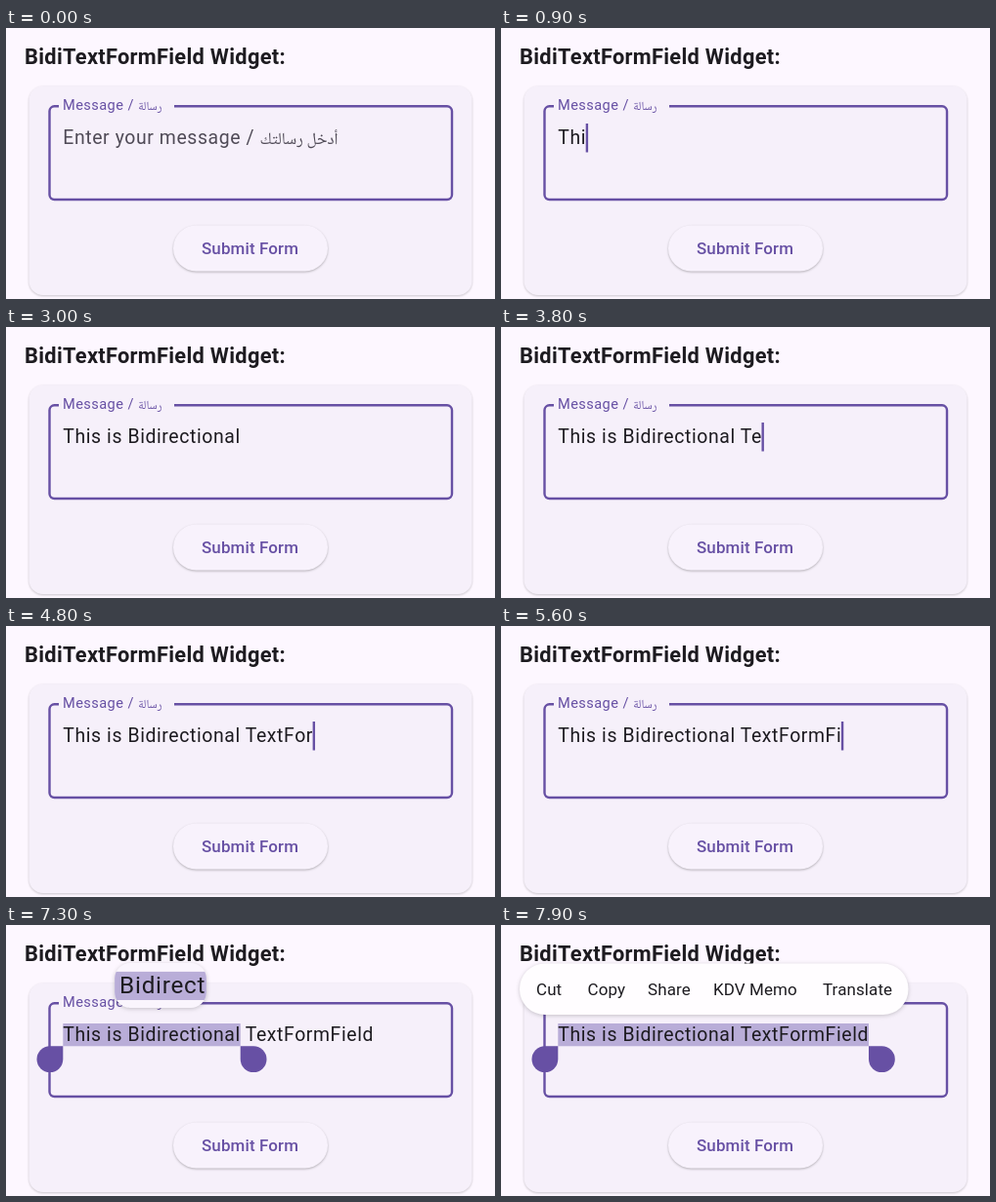
Recreate the animation shown at these times as an HTML page. Size 500 by 278 pixels, loop 8000 ms.

```html
<!DOCTYPE html>
<html lang="en">
<head>
<meta charset="utf-8">
<title>Bidirectional form field</title>
<style>
  html, body { margin: 0; width: 100%; height: 100%; overflow: hidden; background: #fdf7ff; }
  svg { display: block; width: 100vw; height: 100vh; }
  text { font-family: Roboto, "DejaVu Sans", sans-serif; fill: #1d1b20; white-space: pre; }
  .title { font-size: 21.8px; font-weight: 700; letter-spacing: .3px; }
  .body { font-size: 19.4px; letter-spacing: .606px; }
  .label { font-size: 14.55px; letter-spacing: .455px; fill: #6750a4; }
  .button { font-size: 16.97px; font-weight: 500; letter-spacing: .12px; fill: #6750a4; }
  .menu { font-size: 16.97px; letter-spacing: .12px; }
  .hint { fill: #504b57; }
  .arabic { font-family: "Noto Naskh Arabic", "Noto Sans Arabic", "DejaVu Sans", sans-serif; letter-spacing: 0; }
  .body .arabic { font-size: 17px; }
  .label .arabic { font-size: 12.4px; }
  .ink { fill: #6750a4; }
  .card { filter: drop-shadow(0 1px 1px #0003); }
  .raised { filter: drop-shadow(0 1.2px 1.2px #0004); }
  .floating { filter: drop-shadow(0 1px 2px #0003); }
</style>
</head>
<body>
<svg viewBox="0 0 500 278">
  <defs>
    <clipPath id="lensClip"><rect x="-46.9" y="-23" width="93.8" height="46" rx="16"/></clipPath>
    <path id="drop" d="M0 0V13.4A13.4 13.4 0 1 0 13.4 0Z"/>
  </defs>

  <rect width="500" height="278" fill="#fdf7ff"/>
  <text class="title" x="19" y="36.5">BidiTextFormField Widget:</text>
  <rect class="card" x="23.5" y="59.5" width="453" height="214.5" rx="14.5" fill="#f6f0fa"/>

  <path d="M172 80.3H451a5 5 0 0 1 5 5V171a5 5 0 0 1-5 5H49.500a5 5 0 0 1-5-5V85.300a5 5 0 0 1 5-5H54"
        fill="none" stroke="#6750a4" stroke-width="2.4"/>
  <text class="label" x="58" y="84">Message / <tspan class="arabic">رسالة</tspan></text>

  <rect class="raised" x="171" y="202.500" width="158" height="47" rx="23.5" fill="#f8f2fc"/>
  <text class="button" x="200" y="232">Submit Form</text>

  <g id="content">
    <rect id="mark" x="58.300" y="101" height="23.300" fill="#b9add8"/>
    <text id="hint" class="body hint" x="58.300" y="119">Enter your message / <tspan class="arabic">أدخل رسالتك</tspan></text>
    <text id="message" class="body" x="58.300" y="119"></text>
  </g>
  <rect id="caret" class="ink" y="98" width="2.400" height="29.500"/>

  <g id="handles" class="ink">
    <use href="#drop" transform="translate(58.300 124.300) scale(-1 1)"/>
    <use id="endHandle" href="#drop"/>
  </g>

  <g id="lens" class="floating">
    <g clip-path="url(#lensClip)">
      <rect x="-47" y="-23" width="94" height="46" fill="#faf5fd"/>
      <use id="zoom" href="#content"/>
    </g>
  </g>

  <g id="menu">
    <rect class="floating" x="19" y="39.500" width="397.500" height="52.500" rx="26" fill="#fffdff"/>
    <text class="menu" y="71.500"><tspan x="36">Cut</tspan><tspan x="88.500">Copy</tspan><tspan x="150">Share</tspan><tspan x="217">KDV Memo</tspan><tspan x="329">Translate</tspan></text>
  </g>
</svg>

<script>
  const LOOP = 8000, LEFT = 58.3, ZOOM = 1.25;
  const TEXT = "This is Bidirectional TextFormField";
  const el = id => document.getElementById(id);
  const [hint, message, mark, caret, handles, endHandle, lens, zoom, menu] =
    ["hint", "message", "mark", "caret", "handles", "endHandle", "lens", "zoom", "menu"].map(el);

  // [time, typed characters, caret visible]
  const typing = [
    [0, 0, 0], [100, 0, 1], [300, 1, 1], [500, 2, 1], [800, 3, 1], [1000, 4, 1],
    [1200, 5, 1], [1400, 6, 1], [1600, 7, 1], [1700, 8, 1], [1900, 9, 1], [2100, 10, 1],
    [2500, 12, 1], [2700, 15, 1], [2800, 18, 1], [2900, 21, 1], [3000, 21, 0],
    [3200, 22, 1], [3400, 23, 1], [3800, 24, 1], [4000, 26, 1], [4200, 27, 1],
    [4500, 28, 1], [4700, 29, 1], [5100, 30, 1], [5300, 31, 1], [5500, 32, 1],
    [5700, 33, 1], [5900, 34, 1], [6200, 35, 1], [6400, 35, 0]
  ];

  // [time, selected characters, lens centre, menu opacity]
  const selecting = [
    [0, 0, 0, 0], [7000, 4, 82, 0], [7200, 7, 112, 0], [7300, 21, 158, 0],
    [7400, 21, 172, 0], [7600, 35, 262, 0], [7700, 35, 0, .5], [7800, 35, 0, 1]
  ];

  const at = (steps, t) => steps.findLast(s => s[0] <= t);
  const show = (node, on) => node.setAttribute("visibility", on ? "visible" : "hidden");
  const move = (node, x, y, more = "") => node.setAttribute("transform", `translate(${x} ${y}) ${more}`);

  function draw(t) {
    const [, typed, caretOn] = at(typing, t);
    const [, selected, focus, menuAlpha] = at(selecting, t);

    const shown = TEXT.slice(0, typed);
    if (message.textContent !== shown) message.textContent = shown;
    show(hint, !typed);
    caret.setAttribute("x", LEFT + (typed ? message.getComputedTextLength() : 0) - .4);
    show(caret, caretOn);

    const width = selected ? message.getSubStringLength(0, selected) : 0;
    mark.setAttribute("width", width);
    move(endHandle, LEFT + width, 124.3);
    show(handles, selected);

    lens.style.display = focus ? "" : "none";
    move(lens, focus, 62);
    move(zoom, -focus * ZOOM, -112.3 * ZOOM, `scale(${ZOOM})`);
    menu.style.opacity = menuAlpha;
  }

  function tick() {
    draw(performance.now() % LOOP);
    requestAnimationFrame(tick);
  }
  tick();
</script>
</body>
</html>
```
